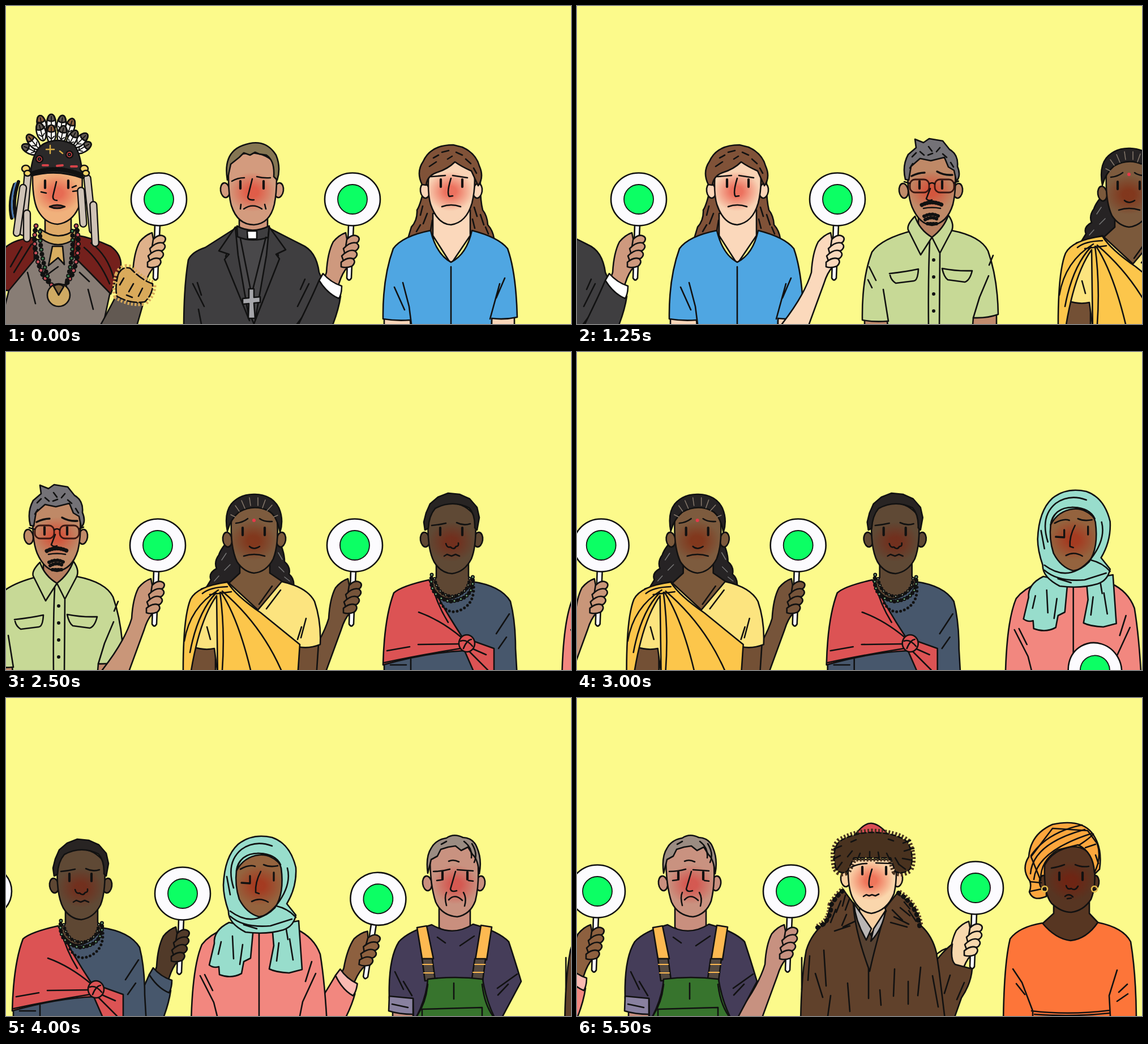
An HTML page for the animation above (5.75 s loop, 998 by 561 pixels).

```html
<!DOCTYPE html>
<html lang="en">
<head>
<meta charset="utf-8">
<title>Raising green signs</title>
<style>
html, body { margin: 0; width: 100%; height: 100%; overflow: hidden; background: #fcfa8b; }
svg { display: block; width: 100vw; height: 100vh; }
svg * { stroke-linecap: round; stroke-linejoin: round; }
</style>
</head>
<body>
<svg id="stage" viewBox="0 0 998 561"></svg>
<script>
const INK = '#111', LOOP = 5750, STEP = 250, HIDDEN = 75, RAISE = 500;

// Drawing helpers
const p = (d, fill = 'none', extra = '') =>
  `<path d="${d}" fill="${fill}" stroke="${INK}" stroke-width="2.6" ${extra}/>`;
const line = (d, color = INK, width = 2.6, dash = '') =>
  `<path d="${d}" fill="none" stroke="${color}" stroke-width="${width}" stroke-dasharray="${dash}"/>`;
const oval = (x, y, rx, ry, fill, turn = 0, width = 2.6) =>
  `<ellipse cx="${x}" cy="${y}" rx="${rx}" ry="${ry}" fill="${fill}" stroke="${INK}" stroke-width="${width}" transform="rotate(${turn} ${x} ${y})"/>`;
const ears = (left, right, y, skin) => oval(left, y, 8, 13, skin, -8) + oval(right, y, 8, 13, skin, 8);
const eyes = (left, right, y) => line(`M${left} ${y}v13M${right} ${y}v13`, INK, 4.2);
const beads = (d, color, size, gap) => line(d, INK, size + 2, `0 ${gap}`) + line(d, color, size - 2, `0 ${gap * 2}`);
const fur = (d, color) =>
  `<path d="${d}" fill="none" stroke="${color}" stroke-width="13" stroke-dasharray="3 3" style="stroke-linecap:butt"/>`;
let gradients = 0;
const blush = (x, y, color, strength = .85) => {
  const id = 'blush' + gradients++;
  return `<radialGradient id="${id}"><stop offset=".25" stop-color="${color}" stop-opacity="${strength}"/>
    <stop offset="1" stop-color="${color}" stop-opacity="0"/></radialGradient>
    <ellipse cx="${x}" cy="${y}" rx="41" ry="35" fill="url(#${id})"/>`;
};

const bareArm = 'M140 610L172 561Q212 510 224 470Q226 435 236 416Q246 404 258 400L262 420V460Q252 470 246 490L220 561L200 620Z';
const fingers = [
  'M260 412Q268 403 276 405Q285 408 280 416Q272 422 258 425Z',
  'M254 428Q266 415 277 418Q285 424 277 431L257 439Z',
  'M251 441Q264 428 274 432Q282 438 274 445L255 452Z',
  'M250 452Q262 442 271 446Q277 452 269 459Q258 463 250 460Z'
];
const sign = p('M263 386L260 480Q264 487 268 480L272 386Z', '#fcfcff')
  + oval(270, 341, 49, 46.5, '#fcfbfe') + oval(270, 341, 26, 26, '#0cff64', 0, 1.8);
const arm = (skin, sleeve) => p(bareArm, skin) + sign + fingers.map(d => p(d, skin)).join('') + sleeve;

function shaman() {
  const feather = (x, y, turn, tip) => oval(x, y, 8, 16, '#fbfaf5', turn)
    + `<g transform="rotate(${turn} ${x} ${y})">` + p(`M${x - 7} ${y - 6}Q${x - 5} ${y - 16} ${x} ${y - 16}Q${x + 5} ${y - 16} ${x + 7} ${y - 6}Q${x} ${y - 1} ${x - 7} ${y - 6}Z`, tip)
    + line(`M${x} ${y - 12}V${y + 14}M${x - 5} ${y + 4}l4 4M${x + 5} ${y + 4}l-4 4`, INK, 1.8) + '</g>';
  const plumes = [[63, 209, -12], [80, 207, 0], [98, 209, 8], [113, 214, 18], [43, 253, -65], [136, 250, 60],
    [48, 240, -40], [132, 237, 45], [62, 222, -15], [80, 226, 0], [99, 227, 12], [117, 234, 28]];
  const tassel = (x, y, h, turn = 0) =>
    `<rect x="${x}" y="${y}" width="12" height="${h}" rx="6" fill="#cfc3b6" stroke="${INK}" stroke-width="2.3" transform="rotate(${turn} ${x + 6} ${y})"/>`;
  return p('M-12 570L8 490L50 412H125L185 500L170 570Z', '#887d75')
    + p('M50 408Q10 412 -5 430L-20 500L5 502L50 448Z', '#74201c')
    + p('M122 404Q150 408 185 424Q204 438 203 458L185 508L150 472L118 440Z', '#74201c')
    + line('M150 418Q180 440 190 480M138 426Q165 448 183 490M28 425L8 460M45 420L14 470')
    + p('M69 370V402Q93 430 115 402V370Z', '#dfaa68')
    + p('M60 393Q93 418 124 393L122 410Q92 432 62 410Z', '#d8ad60')
    + p('M82 424L75 458L92 444L103 456L100 424Z', '#d8ad60')
    + line('M65 480Q85 465 92 460M38 470L52 525M145 500L154 535M130 470L147 486')
    + line('M15 315Q4 345 10 374M22 310Q10 345 18 376', INK, 6) + line('M17 312Q6 345 13 373', '#4a78b0', 3)
    + p('M47 292Q46 340 56 360Q69 384 91 385Q116 382 128 356Q137 330 134 292Z', '#f0b17c') + blush(90, 330, '#e55f4c')
    + plumes.map(([x, y, a], i) => feather(x, y, a, i % 3 ? '#615952' : '#8d603f')).join('')
    + p('M43 300Q46 255 67 243Q95 230 121 246Q132 260 136 304Q90 287 43 300Z', '#2b2929')
    + line('M48 295Q90 280 133 298', INK, 8, '1 4')
    + [[59, 270], [112, 262]].map(([x, y]) => oval(x, y, 6, 6, '#e4494c') + oval(x, y, 2, 2, '#ddd')).join('')
    + line('M65 281h9M90 282l10-1M115 283h10', '#d44248', 4) + line('M78 246v14M71 253h14M95 256l5 4', '#d7ad45', 2.5)
    + tassel(33, 293, 112, 5) + tassel(25, 315, 92, 8) + tassel(31, 360, 56) + tassel(126, 320, 70, -4) + tassel(137, 298, 104, -6) + tassel(148, 345, 79, -3)
    + [35, 138].map(x => oval(x, 287, 7, 6, '#f4d46b') + oval(x + 3, 295, 6, 5, '#f4d46b')).join('')
    + eyes(69, 110, 308) + line('M89 310L83 335Q82 343 90 343M62 328l9 2M118 327l8-1M117 320l7-3')
    + p('M77 354Q90 348 104 354Q90 360 77 354Z', '#773c35')
    + beads('M53 388Q44 430 67 478L88 500M124 388Q134 430 116 476L100 500', '#c75059', 7, 8)
    + beads('M60 398Q60 440 76 485M117 397Q120 440 108 485', '#3c8051', 6, 8)
    + oval(93, 510, 20, 20, '#cfaa63') + p('M93 510L84 494Q94 488 102 495Z', '#80643c');
}

function priest() {
  return p('M314 570Q314 495 322 448Q328 434 352 426L407 391H463L522 421Q548 432 553 470L563 492L520 570Z', '#3f3e40')
    + p('M407 390Q435 384 464 390L481 440L438 561L388 442Z', '#49484a')
    + p('M412 370V393Q435 403 462 392V370Z', '#cf967b') + p('M408 388Q435 403 465 388L463 408Q435 418 409 407Z', '#3f3e40')
    + p('M426 397H443V411H427Z', '#fff')
    + p('M405 390L376 432L394 438L386 447L430 555L410 440Z', '#3f3e40') + p('M465 390L494 430L477 438L483 446L440 555L460 440Z', '#3f3e40')
    + line('M414 410L432 500M459 408L436 500M330 490L350 530M338 488L345 510M345 561L340 535M515 530L535 490M520 500l8-18')
    + p('M429 499H438V514L449 513V523L438 524L440 551H428L429 525L418 526V516L429 515Z', '#a6a6aa')
    + ears(387, 482, 325, '#d39b7e')
    + p('M393 280Q392 330 398 352Q409 386 438 386Q466 384 474 350Q480 320 477 280Q455 252 412 262Z', '#d39b7e') + blush(435, 328, '#e2523f')
    + p('M391 307Q383 259 418 246Q457 231 477 263Q486 285 479 307L473 301Q475 273 460 263L447 261L440 258L431 263L420 259L412 267L397 279Z', '#857653')
    + eyes(414, 455, 309) + line('M399 309Q409 303 421 303M443 301Q455 304 467 303M435 305L427 337Q428 343 438 342M420 358Q436 347 452 358M415 350l-1 8M457 350l2 8');
}

function woman() {
  return p('M742 305Q733 350 726 360Q727 378 716 390L710 410H862Q860 396 851 386Q850 370 842 360Q837 340 838 305Z', '#805238')
    + line('M736 353l-4 16M744 366l-7 18M732 386l-7 12M753 378l-3 18M827 355l5 16M838 368l6 18M824 376l4 16M847 390l5 12')
    + p('M668 548H715V575H668ZM858 548H898V575H858Z', '#f9d6b9')
    + p('M754 366V405L786 455L820 405V360Z', '#fbd8bb')
    + p('M666 552Q665 480 684 428Q700 406 750 396Q760 438 786 452Q814 438 823 396Q870 408 886 428Q901 470 903 549Q880 554 858 551L857 575H716L714 554Q690 556 666 552Z', '#4fa6e2')
    + line('M786 460V570M686 496L704 536M701 488L712 530L716 561M881 480L866 515M872 490L855 552')
    + ears(740, 833, 326, '#fbd5b8')
    + p('M747 290Q744 330 750 350Q762 385 786 386Q813 382 823 348Q830 320 827 290L792 265Z', '#f9d3b5') + blush(785, 327, '#ea6150')
    + p('M735 315Q724 293 737 274Q750 245 790 245L806 249Q830 260 836 282Q845 302 834 317L822 291Q804 283 793 275Q780 288 760 294Q744 300 742 316Z', '#805238')
    + line('M770 258l12-3M755 268l9-5M748 283l12-8M795 258l11 5M812 270l9 8M780 270l8-5M826 286l5 9')
    + eyes(768, 806, 306) + line('M751 301L776 299M789 299L815 303M786 304Q778 330 783 336L789 335M770 354Q786 348 803 354');
}

function man() {
  return p('M508 545H550V575H508ZM698 545H741V575H698Z', '#c18b6d')
    + p('M504 554Q503 480 521 434Q538 410 594 396L662 396Q713 406 726 432Q743 480 744 544Q725 551 700 550L698 575H550L548 556Q525 558 504 554Z', '#c7d996')
    + p('M603 368V395L627 410L654 390V364Z', '#b77f60')
    + p('M597 371Q582 386 585 395L607 439L627 408Q605 395 597 371Z', '#c7d996') + p('M656 369Q668 386 661 398L641 436L627 408Q648 392 656 369Z', '#c7d996')
    + line('M623 415Q620 480 621 570M641 437L640 570M552 472Q580 469 603 464Q602 484 595 485L563 489Q555 484 553 475M645 463Q670 468 698 467Q694 484 685 487L655 483Q648 478 645 463M516 460l12 24M514 483l7 14M541 500L550 556M735 440l-7 17M727 476L711 514L700 550')
    + line('M630 448v.1M630 478v.1M630 508v.1M630 538v.1', INK, 6)
    + ears(577, 673, 326, '#c08b69')
    + p('M585 280Q582 330 592 355Q605 385 627 387Q654 383 664 350Q671 320 667 280L640 262H605Z', '#bf8967') + blush(626, 326, '#d9452f', .75)
    + p('M580 306Q574 282 585 262L599 250L597 235L612 241L622 234L646 238L658 253Q674 262 672 283Q679 300 670 309L666 290L656 284L649 267L625 273L606 269L590 283L586 307Z', '#747277')
    + line('M592 266l7-7M606 257l7 6M621 248l6 8M635 257l6-7M646 261l7 6M660 276l5 8M588 286l5-8M620 263l8-3')
    + line('M591 300Q603 294 614 294M636 292Q648 299 663 298', INK, 3.5) + eyes(605, 645, 309)
    + ['588', '632'].map(x => `<rect x="${x}" y="306" width="34" height="23" rx="9" fill="none" stroke="#3b1712" stroke-width="2.8"/>`).join('')
    + line('M622 314Q627 310 632 314M588 313L578 310M666 312l8-3M624 322L617 340Q621 345 627 342M612 357Q627 354 642 357')
    + line('M609 351Q627 342 645 351', INK, 7, '1 4') + line('M613 371Q627 364 639 371M615 377Q627 370 638 377M619 384H636', INK, 6, '1 4');
}

function sari() {
  return p('M400 325Q380 345 376 358Q367 370 372 382Q357 390 362 402L354 415H508Q510 400 500 392Q503 379 492 370Q492 350 478 325Z', '#262324')
    + line('M389 355l-8 12M396 375l-10 10M376 395l-8 9M481 354l7 12M482 379l9 9M492 397l9 7', '#777', 1.5)
    + p('M325 515H370V575H325ZM510 500H553L548 575H500Z', '#735035')
    + p('M413 370V390L389 412L445 458L491 407L466 390V370Z', '#7b593b')
    + p('M330 520Q332 470 345 418L391 405L445 455L487 405Q532 415 545 440Q557 475 555 516Q535 524 516 520L505 575H375L368 523Q350 527 330 520Z', '#fce47f')
    + p('M313 575Q312 470 326 436Q338 413 391 406Q406 430 450 460L519 516L515 575H374L372 430Q340 475 325 575Z', '#fcc64b')
    + line('M375 420Q325 450 315 510M371 425Q338 460 325 530M378 424Q387 490 382 561M380 424Q410 470 432 561M382 422Q450 480 486 561M391 414Q360 415 347 426M398 423L360 428M470 413L447 445M485 420L460 453M355 485l6 22M530 470l-9 34M522 485l-7 22')
    + ears(391, 486, 331, '#7b593b')
    + p('M398 295Q396 345 408 370Q420 388 438 390Q460 388 472 365Q482 340 479 295Q470 270 438 270Q407 272 398 295Z', '#7d5b3e') + blush(437, 333, '#832c12', .75)
    + p('M391 316Q385 285 398 268Q414 250 440 251Q470 252 482 275Q491 296 484 318Q478 287 463 280Q438 268 412 282Q397 294 391 316Z', '#262324')
    + line('M405 271l7 10M416 262l6 14M430 257l2 14M445 257v14M458 261l-5 14M470 270l-9 10M397 287l8 4M480 288l-7 3', '#86796c', 1.5)
    + `<circle cx="438" cy="297" r="3" fill="#e8384a"/>`
    + eyes(418, 457, 310) + line('M406 302Q418 301 427 294M448 294Q456 300 470 299M430 343Q438 350 448 343M420 360Q438 354 457 360');
}

function warrior() {
  return p('M330 575V545L400 414L485 405Q536 412 553 440Q562 475 562 523L565 575Z', '#47576c')
    + p('M422 370V398L410 405Q440 465 488 406L479 396V370Z', '#5e4733')
    + p('M328 552Q330 470 347 425Q360 413 409 402Q433 450 468 503L524 523V575H493L472 527Q405 530 328 552Z', '#dc5354')
    + line('M467 504Q430 473 391 459M462 515L390 516M465 523Q390 535 330 548M480 528L513 561M485 523L510 534M335 527L375 520M377 542V561M415 411Q423 445 443 477M528 497L551 462M532 523l14-20M341 552h28')
    + oval(476, 514, 14, 15, '#dc5354') + line('M465 510Q475 506 486 519M470 523Q476 508 484 507')
    + beads('M414 393Q408 433 448 440Q492 435 486 393', '#6fa879', 5, 6) + beads('M419 400Q425 430 450 431Q479 428 481 398', '#b5c6a4', 4, 6)
    + line('M430 443Q445 468 471 452Q490 440 488 410', INK, 5, '0 7')
    + ears(402, 496, 331, '#5e4733')
    + p('M408 290Q405 345 418 370Q430 390 450 391Q472 388 484 365Q494 340 491 290Q470 263 440 267Q415 270 408 290Z', '#5f4935') + blush(449, 335, '#792514', .7)
    + p('M402 314L400 300L404 284L411 268L425 256L443 249L463 251L481 259L494 274L498 292L494 314L490 310Q491 287 480 275Q450 260 420 276Q409 289 408 311Z', '#282423')
    + eyes(429, 468, 310) + line('M414 306Q426 305 439 302M458 301Q470 307 482 303M439 338Q441 346 447 344Q453 350 457 343Q462 343 461 337M436 360L441 357L449 360L456 357L463 360');
}

function scarfWoman() {
  const teal = '#98ddcc';
  return p('M327 575Q329 475 346 435Q360 417 385 408H513Q544 422 555 452Q563 500 567 575Z', '#f2877f')
    + line('M447 414V570M343 490L367 537L373 561M351 488l14 28M540 465L529 500M547 486L524 536L519 561')
    + p('M394 396Q366 410 368 433L359 471Q367 477 376 474L377 488Q398 496 416 486L420 465L432 459L437 405Z', teal)
    + p('M470 402L473 437L465 478Q477 484 500 485L523 479L517 393Z', teal)
    + p('M384 330Q386 280 410 258Q435 238 470 246Q502 257 512 299Q514 333 496 363L512 383Q508 403 490 409Q460 418 423 413Q392 397 393 376Q384 350 384 330Z', teal)
    + p('M407 305Q410 277 445 274Q480 276 486 300Q492 345 475 370Q460 385 447 386Q425 380 412 355Q404 330 407 305Z', '#94633e') + blush(447, 331, '#a7341c')
    + p('M407 305Q413 273 448 274Q476 275 485 294Q468 275 447 277Q420 280 407 305Z', teal)
    + line('M402 335Q388 290 416 267Q440 250 470 261M497 300Q505 330 478 365Q440 409 396 376M478 367Q499 372 512 387M396 385Q420 406 467 402L505 390M420 400L443 407M390 315L396 347M380 430l-5 22M400 420L402 460M418 435l-5 35M482 432l-4 32M501 425L507 462M495 408l3 18')
    + line('M431 314v13L416 326M473 308v14', INK, 3.3) + line('M414 302Q430 293 440 297M455 294Q466 299 480 296M450 306Q440 325 441 343L447 345M434 359Q448 351 463 360');
}

function farmer() {
  return p('M368 550H404V575H368Z', '#c98f7e')
    + p('M450 365V405Q475 430 505 405V365Z', '#c98f7e')
    + p('M362 530Q360 460 379 430Q395 412 437 400Q474 422 510 399Q556 412 573 430Q583 460 595 500L555 575H405L404 530Z', '#453d59')
    + p('M362 526L404 530V558Q380 558 361 552Z', '#8981a0')
    + p('M411 405L428 402L440 460H420Z', '#fdb951') + p('M524 401L543 404L534 462H514Z', '#fdb951')
    + p('M420 460H438L443 497L425 499Z', '#554a41') + p('M513 460H532L527 499L508 495Z', '#554a41')
    + line('M421 470h17M423 485h17M513 470h18M510 484h18', '#fdb951', 2)
    + p('M403 575Q427 535 430 496Q478 490 527 496Q534 540 554 575Z', '#37742d')
    + line('M476 503V531M420 561V549L526 546V561M430 505Q427 537 411 561M526 505Q530 540 545 561M372 483l15 31M387 500l15 25M447 422L461 432M512 420L487 437M553 512L588 487M554 524L572 505M367 540L395 546')
    + ears(429, 523, 327, '#c98f7e')
    + p('M434 280Q434 330 444 360Q455 384 482 386Q505 382 514 358Q522 325 518 280L500 260H458Z', '#c99280') + blush(479, 329, '#d84642', .75)
    + p('M430 309Q426 280 436 265Q444 250 463 247Q476 238 492 246Q511 247 517 264Q526 285 521 310Q519 285 509 276L501 263L489 269L479 261L466 263L453 267L447 279L436 285Z', '#9b8c82')
    + line('M494 253Q509 264 507 282M508 257Q519 275 512 290M454 258l9-5')
    + eyes(456, 500, 307) + line('M440 306Q455 306 469 302M482 303L510 305M446 322l8-1M502 322l8 1M467 288Q475 284 485 289M479 306L470 337Q472 343 481 340M467 356Q478 344 491 357M463 343Q459 351 463 366M493 343Q499 353 495 367');
}

function herder() {
  const hat = 'M457 300Q449 265 465 252Q490 238 520 237Q565 238 584 254Q597 280 588 302Q575 312 562 306L554 282H489L478 305Q465 313 457 300Z';
  const collar = 'M425 405Q448 395 449 365Q460 347 472 338M568 344Q600 365 605 402';
  return p('M395 575Q396 490 405 445Q414 415 440 395Q450 350 470 338L488 362L517 440L545 370L565 345Q600 365 608 402Q628 420 635 450L640 485L651 575Z', '#60412b')
    + fur(collar, '#60412b') + line(collar, INK, 8, '1 9')
    + line('M448 382l-11 19M457 373l-9 23M466 358l-8 20M474 348l-5 19M481 355l-7 19M476 382l-8 19M493 393L470 404M482 402L455 411M578 360l10 12M571 370l17 14M557 374l18 18M560 386l26 13M554 396l29 8M586 375l13 19')
    + line('M397 458V515M411 455l-3 43M436 445l4 63M421 486l13 42M448 525l-5 36M478 503l4 50M515 475V530M561 478l-2 48M607 475l-5 50M585 500v40M535 515l2 27M628 490l10 55')
    + p('M499 365V388L517 420L546 376L540 360Z', '#f8d0a2')
    + p('M488 361Q490 410 517 482Q526 440 544 380L520 420L488 361Z', '#564131')
    + p('M489 362L520 407L511 427Q492 394 489 362ZM545 375L524 407L519 429Q540 407 545 375Z', '#bab6b5')
    + ears(474, 567, 320, '#f8d0a2')
    + p('M479 285Q477 335 488 355Q500 378 520 380Q548 375 560 345Q566 320 563 285Z', '#fad6ac') + blush(519, 322, '#ed654d')
    + p('M493 239Q508 220 520 221Q533 222 548 239Z', '#d94e54')
    + fur(hat, '#49321f') + p(hat, '#49321f', 'stroke-dasharray="8 5"')
    + line('M467 261l-13 5M465 278l-12 6M468 290l-8 11M576 256l13-5M578 270l17-5M575 283l16 3M568 293l12 9M486 270l-8 10M500 274l-4 10M517 271v11M532 272l2 12M547 274l6 12M562 282l7 12M493 250l-9 4M550 249l9 3')
    + eyes(504, 546, 298) + line('M485 298Q498 292 512 292M528 291L555 292M521 302Q513 326 517 334L522 333M506 350L511 347L516 349L521 347L527 349L533 346');
}

function turbanWoman() {
  return p('M842 365V380L820 400Q850 434 872 432Q905 428 922 398L905 380V360Z', '#573622')
    + p('M753 575Q754 470 765 425Q780 404 822 397Q845 425 872 428Q900 425 920 396Q965 405 978 430Q988 490 988 575Z', '#fd7539')
    + line('M770 478L786 502L805 552V561M776 504l15 19M954 480L940 525L942 561M957 519l15-14M954 535l19-13M803 552Q870 560 941 551M808 558Q875 563 940 556')
    + p('M829 350Q805 360 799 342Q803 332 800 323Q784 302 798 280Q801 240 840 223Q888 213 909 237Q929 263 923 302L905 320L829 330Z', '#fca63d')
    + ears(825, 914, 326, '#573622')
    + p('M826 295Q824 345 838 362Q855 378 873 378Q895 375 908 355Q918 330 913 292Q905 262 875 262Q840 268 826 295Z', '#573522') + blush(872, 323, '#76200f', .75)
    + p('M819 322Q818 288 849 268L885 259Q912 272 914 308Q927 282 919 257L902 234L840 230L802 280Z', '#fca63d')
    + line('M801 310Q805 257 897 232M807 320Q812 270 909 239M802 278Q830 237 892 224M886 260Q905 248 912 240M898 264L916 258M800 324L820 326M801 341L825 336M916 277l5 15')
    + [826, 914].map(x => `<circle cx="${x}" cy="337" r="5" fill="none" stroke="#e5bd4b" stroke-width="2.5"/>`).join('')
    + eyes(852, 893, 308) + line('M838 300Q851 298 861 294M880 294Q891 299 904 297M864 331Q866 339 873 336Q880 341 885 332M862 350Q869 344 876 351M866 354l7-1');
}

const cuffed = (sleeve, cuff) => p('M140 620L175 561Q200 510 211 484Q230 502 249 512Q245 540 230 575L210 620Z', sleeve)
  + p('M211 484L218 472Q232 488 251 494Q251 508 246 516Q226 508 211 484Z', cuff);
const furCuff = 'M198 474Q205 458 220 463Q240 484 259 490Q260 508 245 522Q220 526 196 512Q192 497 198 474Z';
const shamanSleeve = p('M145 620L168 561Q185 530 194 512L242 526L215 620Z', '#625952')
  + fur(furCuff, '#d9aa5b') + p(furCuff, '#d9aa5b', 'stroke-dasharray="16 5"') + line('M208 480l-7 12M225 490l-8 14M241 498l-7 14M213 510l10 4');
const herderSleeve = p('M135 620L180 500Q205 458 229 440Q225 468 234 476L264 484Q262 510 245 535L215 620Z', '#60412b')
  + line('M190 470Q205 452 218 448M250 508l-13 30M225 495l-10 32M197 490l-5 30');

// scene: camera position the coordinates belong to; center: head position; start: when the arm goes up
const people = [
  { scene: 0, center: 92, start: -900, skin: '#dfb18a', sleeve: shamanSleeve, front: true, art: shaman() },
  { scene: 0, center: 434, start: -600, skin: '#ce997e', sleeve: cuffed('#3f3e40', '#fff'), front: true, art: priest() },
  { scene: 0, center: 785, start: 500, skin: '#fbd9bc', front: true, art: woman() },
  { scene: 503, center: 627, start: 1250, skin: '#c99679', front: true, art: man() },
  { scene: 1040, center: 438, start: 2000, skin: '#76543a', art: sari() },
  { scene: 1378, center: 451, start: 2950, skin: '#513a29', sleeve: cuffed('#47576c', '#47576c'), lift: 4, art: warrior() },
  { scene: 1695, center: 450, start: 3650, skin: '#8d603f', sleeve: cuffed('#f2877f', '#fbbab2'), art: scarfWoman() },
  { scene: 2010, center: 477, start: 4220, skin: '#c79180', art: farmer() },
  { scene: 2287, center: 519, start: 4980, skin: '#f8d8ad', sleeve: herderSleeve, lift: -6, shift: 7, art: herder() },
  { scene: 2287, center: 872, start: 5750, skin: '#573622', art: turbanWoman() }
];

const stage = document.getElementById('stage');
stage.innerHTML = [...people].reverse().map(({ center, skin, sleeve = '', front, art, shift = 0, lift = 0 }) => {
  const limb = `<g transform="translate(${center - 92 + shift} ${lift})"><g class="arm">${arm(skin, sleeve)}</g></g>`;
  return `<g class="person">${front ? art + limb : limb + art}</g>`;
}).join('');
const groups = [...stage.querySelectorAll('.person')].reverse();
const arms = groups.map(g => g.querySelector('.arm'));

const track = [[0, 0], [1250, 503], [2500, 1040], [3250, 1378], [4000, 1695], [4750, 2010], [5500, 2287]];
function cameraAt(t) {
  const i = track.findIndex(([end], k) => k && t <= end);
  const [t0, x0] = track[i - 1], [t1, x1] = track[i];
  return x0 + (x1 - x0) * (t - t0) / (t1 - t0);
}

function draw() {
  const t = Math.floor(performance.now() % LOOP / STEP) * STEP;
  const camera = cameraAt(t);
  people.forEach(({ scene, start }, i) => {
    const progress = Math.min(1, Math.max(0, (t - start) / RAISE));
    groups[i].setAttribute('transform', `translate(${scene - camera})`);
    arms[i].setAttribute('transform', `rotate(${HIDDEN * (1 - progress) ** 2} 172 597)`);
  });
  requestAnimationFrame(draw);
}
draw();
</script>
</body>
</html>
```
